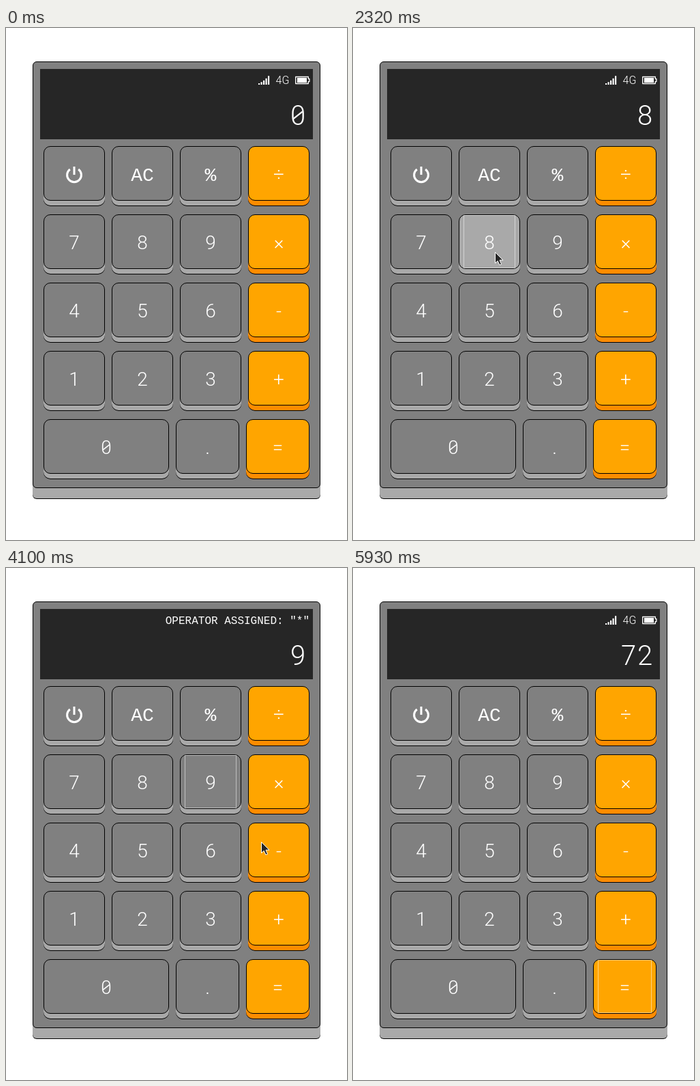
Write an HTML page that moves like this. It is 500 by 750 pixels and loops after 6.68 s.

```html
<!DOCTYPE html>
<html lang="en">
<head>
<meta charset="utf-8">
<title>Calculator</title>
<style>
  html, body { margin: 0; width: 100%; height: 100%; overflow: hidden; background: #fff; }
  svg { display: block; }
  text { fill: #fff; font-family: Roboto, sans-serif; font-weight: 300; text-anchor: middle; }
  .mono { font-family: "Roboto Mono", "Liberation Mono", monospace; }
  .line { fill: none; stroke: #fff; }
</style>
</head>
<body>
<svg id="stage" width="500" height="750" viewBox="0 0 500 750"></svg>
<script>
const LOOP = 6680;
const LAG = 90; // the hover colour trails the pointer
const stage = document.getElementById('stage');
const GRAY = { face: '#808080', lit: '#a9a9a9' };
const ORANGE = { face: '#ffa500', lit: '#ff8c00' };

function add(parent, tag, attrs = {}, text = '') {
  const el = document.createElementNS('http://www.w3.org/2000/svg', tag);
  for (const k in attrs) el.setAttribute(k, attrs[k]);
  el.textContent = text;
  return parent.appendChild(el);
}

const show = (el, on) => el.setAttribute('visibility', on ? 'visible' : 'hidden');

// A bordered slab with a lighter edge below it
function slab(x, y, w, h, r, depth, colors) {
  const box = (dy, fill) => add(stage, 'rect', { x, y: y + dy, width: w, height: h, rx: r, fill });
  box(depth + 1, '#000');
  box(depth, colors.lit);
  return add(stage, 'rect', {
    x: x + .5, y: y + .5, width: w - 1, height: h - 1, rx: r - .5, fill: colors.face, stroke: '#000'
  });
}

// Evenly pitched digits ending in the cell around x; zeros are slashed
function digits(parent, str, x, y, size) {
  [...str].reverse().forEach((c, i) => {
    const cx = x - i * size * .6;
    add(parent, 'text', { x: cx, y, 'font-size': size }, c);
    if (c === '0') {
      add(parent, 'path', {
        d: `M${cx - size * .17} ${y - size * .22}L${cx + size * .17} ${y - size * .49}`,
        class: 'line', 'stroke-width': size * .055
      });
    }
  });
}

const keys = [];
function addKey(id, x, y, w, colors) {
  const face = slab(x, y, w, 80, 10, 7, colors);
  const cx = x + w / 2;
  if (id === 'power') {
    add(stage, 'path', {
      d: `M${cx - 6.2} ${y + 34}A10.4 10.4 0 1 0 ${cx + 6.2} ${y + 34}M${cx} ${y + 30}v12`,
      class: 'line', 'stroke-width': 3
    });
  } else if (id >= '0' && id <= '9') {
    digits(stage, id, cx, y + 51, 28);
  } else {
    const style = /AC|%/.test(id) ? 'mono' : '';
    add(stage, 'text', { x: cx, y: y + 51, 'font-size': 28, class: style }, id);
  }
  const ring = add(stage, 'rect', {
    x: x + 7.5, y: y + 1.5, width: w - 15, height: 77, class: 'line', 'stroke-dasharray': '1 1'
  });
  keys.push({ id, x, y, w, colors, face, ring });
}

slab(39, 49, 422, 625, 6, 15, GRAY);
add(stage, 'rect', { x: 50, y: 60, width: 400, height: 103, fill: '#262626' });

['power AC % ÷', '7 8 9 ×', '4 5 6 -', '1 2 3 +'].forEach((row, r) =>
  row.split(' ').forEach((id, c) =>
    addKey(id, 55 + c * 100, 173 + r * 100, 90, c === 3 ? ORANGE : GRAY)));
addKey('0', 55, 573, 184, GRAY);
addKey('.', 249, 573, 93, GRAY);
addKey('=', 352, 573, 93, ORANGE);

const status = add(stage, 'g');
for (let i = 0; i < 5; i++) {
  const h = 2 + i * 1.5 + i * i * .3;
  add(status, 'rect', { x: 370 + i * 3.5, y: 83 - h, width: 2.2, height: h, fill: '#fff' });
}
add(status, 'text', { x: 405.5, y: 82, 'font-size': 16 }, '4G');
add(status, 'path', { d: 'M424.7 71.5h18.6v3h1.6v4h-1.6v3h-18.6z',
  class: 'line', 'stroke-width': 1.3, 'stroke-linejoin': 'round' });
add(status, 'rect', { x: 427, y: 73, width: 14, height: 7, fill: '#fff' });

const message = add(stage, 'text', {
  x: 445, y: 82, 'font-size': 16, class: 'mono', style: 'text-anchor: end'
});
const readout = add(stage, 'g');
const cursor = add(stage, 'path', {
  d: 'M.5 .5V16.5L4.2 13.2L6.9 19.2L9.6 18L7 12.1H12Z',
  fill: '#262626', stroke: '#fff', 'stroke-linejoin': 'round'
});

// Pointer runs as [time, x, y]
const runs = [
  [[790, 478, 727], [1050, 60, 560], [1110, 8, 497]],
  [[1440, 31, 235], [1690, 132, 251], [1780, 132, 251], [2000, 195, 315], [2300, 200, 325],
   [2680, 343, 385], [2770, 347, 345], [2900, 370, 320], [3340, 370, 320], [3490, 327, 326],
   [3550, 327, 326], [3955, 308, 326], [4100, 374, 401], [4160, 374, 401], [4700, 412, 609],
   [5800, 412, 609], [5890, 490, 594]]
];
const clicks = [[1780, 'power'], [2140, '8'], [2990, '×'], [3880, '9'], [5080, '=']];

function pointer(t) {
  const run = runs.find(r => t >= r[0][0] && t < r.at(-1)[0]);
  if (!run) return null;
  const i = run.findLastIndex(p => p[0] <= t);
  const [t0, x0, y0] = run[i], [t1, x1, y1] = run[i + 1];
  const k = (t - t0) / (t1 - t0);
  return { x: Math.round(x0 + (x1 - x0) * k), y: Math.round(y0 + (y1 - y0) * k) };
}

// Replay the clicks made so far
function calculate(t) {
  const s = { value: '0', note: '', focus: '', first: 0 };
  for (const [when, id] of clicks) {
    if (when > t) break;
    s.focus = id;
    if (id === 'power') {
      s.value = '0';
    } else if (id === '×') {
      s.first = +s.value;
      s.note = 'OPERATOR ASSIGNED: "*"';
    } else if (id === '=') {
      s.value = String(s.first * s.value);
      s.note = '';
    } else {
      s.value = id;
    }
  }
  return s;
}

const inside = (p, k) => p && p.x >= k.x && p.x < k.x + k.w && p.y >= k.y && p.y < k.y + 80;

function draw(t) {
  const { value, note, focus } = calculate(t);
  const trail = pointer(t - LAG);
  for (const k of keys) {
    k.face.setAttribute('fill', inside(trail, k) ? k.colors.lit : k.colors.face);
    show(k.ring, k.id === focus);
  }
  readout.replaceChildren();
  digits(readout, value, 428, 142, 40);
  message.textContent = note;
  show(status, !note);
  const p = pointer(t);
  show(cursor, p);
  if (p) cursor.setAttribute('transform', `translate(${p.x} ${p.y})`);
}

const start = performance.now();
function tick() {
  draw((performance.now() - start) % LOOP);
  requestAnimationFrame(tick);
}
tick();
</script>
</body>
</html>
```
